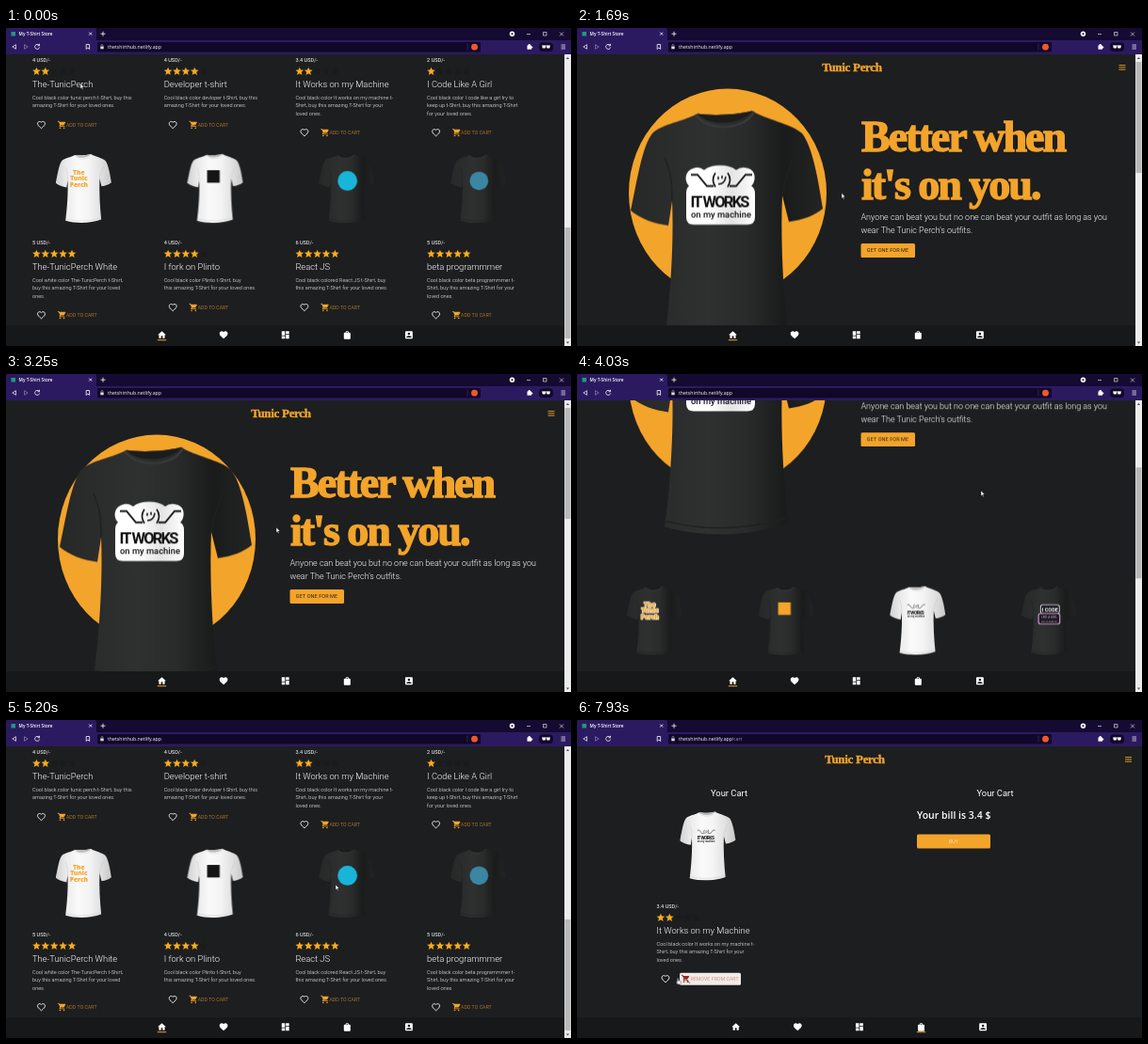
Animation of 600x338 px, one loop 8000 ms. Source, as an HTML page:

```html
<!DOCTYPE html>
<html lang="en">
<head>
<meta charset="utf-8">
<title>My T-Shirt Store</title>
<style>
  html, body { margin: 0; width: 100%; height: 100%; overflow: hidden; background: #1d1e20; }
  svg { display: block; }
  text { font-family: Roboto, sans-serif; fill: #fff; white-space: pre; }
  .ui { font-family: "Open Sans", sans-serif; font-size: 5.2px; }
  .light { font-weight: 300; }
  .small { font-size: 5.6px; }
  .btn { font-size: 5.2px; letter-spacing: .08px; }
  .lead { font-size: 8.95px; font-weight: 300; }
  .title { font-size: 9.4px; font-weight: 300; }
  .head { font-size: 9.4px; text-anchor: middle; }
  .bill { font: 600 10.5px "Open Sans", sans-serif; }
  .brand { font: bold 13px "Liberation Serif", serif; letter-spacing: -.3px; text-anchor: middle; fill: #f3a42b; stroke: #f3a42b; stroke-width: .4; }
  .slogan { font: bold 46px "Liberation Serif", serif; letter-spacing: -2px; fill: #f3a42b; stroke: #f3a42b; stroke-width: 1.4; }
  .mid { text-anchor: middle; }

  .anim { animation: 8s linear infinite; }
  .scroll { animation-name: scroll; }
  .thumb { animation-name: thumb; }
  .cursor { animation-name: cursor; }
  .hero { animation-name: hero; animation-timing-function: ease-in-out; }
  .list { animation-name: list; animation-timing-function: ease-in-out; }
  .cart { animation-name: cart; animation-timing-function: ease-in-out; }
  .blink, .show-cart, .show-buy, .hide-buy, .show-hover, .hide-hover { animation-timing-function: step-end; }
  .blink { animation-name: blink; }
  .show-cart { animation-name: showCart; }
  .show-buy { animation-name: showBuy; }
  .hide-buy { animation-name: hideBuy; }
  .show-hover { animation-name: showHover; }
  .hide-hover { animation-name: hideHover; }

  @keyframes scroll {
    0%, 6.5% { transform: translateY(-460px); animation-timing-function: ease-in-out; }
    17.9%, 46.25% { transform: none; animation-timing-function: linear; }
    50.375% { transform: translateY(-166px); animation-timing-function: cubic-bezier(.3, .5, .6, 1); }
    58%, 100% { transform: translateY(-460px); }
  }
  @keyframes thumb {
    0%, 6.5% { transform: translateY(176px); animation-timing-function: ease-in-out; }
    17.9%, 46.25% { transform: none; animation-timing-function: linear; }
    50.375% { transform: translateY(63px); animation-timing-function: cubic-bezier(.3, .5, .6, 1); }
    58%, 100% { transform: translateY(176px); }
  }
  @keyframes hero {
    0%, 2.4%, 38.6%, 75%, 100% { transform: translateY(-10.5px); }
    20.5%, 56.75% { transform: none; }
  }
  @keyframes list {
    0% { transform: translateY(-3px); animation-timing-function: ease-out; }
    11.9%, 48.1%, 84.4%, 100% { transform: translateY(-11px); }
    30%, 66.25% { transform: none; }
  }
  @keyframes cart {
    0%, 77.5% { transform: none; }
    95.6% { transform: translateY(-11px); }
    100% { transform: translateY(-9.5px); }
  }
  @keyframes cursor {
    0%, 7% { transform: translate(79px, 59px); animation-timing-function: ease-in-out; }
    16%, 21.2% { transform: translate(281px, 175.5px); }
    40.6%, 42% { transform: translate(287px, 163px); animation-timing-function: ease-in-out; }
    49.5%, 57% { transform: translate(429px, 124px); animation-timing-function: ease-in-out; }
    65%, 66% { transform: translate(350px, 175px); }
    69%, 71% { transform: translate(350px, 109px); animation-timing-function: ease-in-out; }
    76.5%, 78% { transform: translate(362px, 324px); }
    86% { transform: translate(150px, 271px); }
    91% { transform: translate(112px, 273px); }
    98%, 100% { transform: translate(106.5px, 274.5px); }
  }
  @keyframes blink { 0%, 84% { opacity: 1; } 78.5% { opacity: 0; } }
  @keyframes showCart { 0% { visibility: hidden; } 78%, 100% { visibility: visible; } }
  @keyframes showBuy { 0% { opacity: 0; } 88.75%, 100% { opacity: 1; } }
  @keyframes hideBuy { 0% { opacity: 1; } 88.75%, 100% { opacity: 0; } }
  @keyframes showHover { 0% { opacity: 0; } 90%, 100% { opacity: 1; } }
  @keyframes hideHover { 0% { opacity: 1; } 90%, 100% { opacity: 0; } }
</style>
</head>
<body>
<svg id="stage" width="600" height="338" viewBox="0 0 600 338"></svg>
<script>
const ORANGE = '#f3a42b', BG = '#1d1e20';

const ICONS = {
  home: 'M10 20v-6h4v6h5v-8h3L12 3 2 12h3v8z',
  heart: 'M12 21.3C5.4 15.4 2 12.3 2 8.5 2 5.4 4.4 3 7.5 3c1.7 0 3.4.8 4.5 2.1C13.1 3.8 14.8 3 16.5 3 19.6 3 22 5.4 22 8.5c0 3.8-3.4 6.9-10 12.8z',
  grid: 'M3 13h8V3H3zm0 8h8v-6H3zm10 0h8V11h-8zm0-18v6h8V3z',
  bag: 'M18 6h-2a4 4 0 0 0-8 0H6a2 2 0 0 0-2 2v12a2 2 0 0 0 2 2h12a2 2 0 0 0 2-2V8a2 2 0 0 0-2-2zM12 4a2 2 0 0 1 2 2h-4a2 2 0 0 1 2-2z',
  user: 'M3 5v14a2 2 0 0 0 2 2h14a2 2 0 0 0 2-2V5a2 2 0 0 0-2-2H5a2 2 0 0 0-2 2zm12 4a3 3 0 0 1-6 0 3 3 0 0 1 6 0zm-9 8c0-2 4-3.1 6-3.1s6 1.1 6 3.1v1H6z',
  cart: 'M7 18a2 2 0 1 0 0 4 2 2 0 0 0 0-4zM1 2v2h2l3.6 7.6-1.4 2.4C4.5 15.5 5.5 17 7 17h12v-2H7.4l1-2h7.2c.7 0 1.4-.4 1.7-1L21 5.5C21.3 4.8 20.8 4 20 4H5.2l-.9-2zm16 16a2 2 0 1 0 0 4 2 2 0 0 0 0-4z',
  star: 'M12 17.3 18.2 21l-1.7-7L22 9.2l-7.2-.6L12 2 9.2 8.6 2 9.2 7.5 14 5.8 21z',
};

const text = (x, y, cls, str, more = '') => `<text x="${x}" y="${y}" class="${cls}" ${more}>${str}</text>`;
const rect = (x, y, w, h, fill, r = 0) => `<rect x="${x}" y="${y}" width="${w}" height="${h}" rx="${r}" fill="${fill}"/>`;
const line = (d, color = '#fff', w = .8) => `<path d="${d}" fill="none" stroke="${color}" stroke-width="${w}"/>`;
const anim = (name, body) => `<g class="anim ${name}">${body}</g>`;
const icon = (name, cx, cy, size, paint = 'fill="#fff"') =>
  `<path d="${ICONS[name]}" transform="translate(${cx - size / 2} ${cy - size / 2}) scale(${size / 24})" ${paint}/>`;

// Shirt and prints share the large shirt's coordinates
const shirt = dark => `
  <path fill="url(#${dark ? 'black' : 'white'})" d="M128 91C114 99 90 102 80 112C69 126 64 162 57 194C68 203 82 208 97 210L101 184C103 228 99 290 93 332C130 343 185 343 224 328C219 280 216 225 218 178L225 206C240 204 253 199 261 192C256 160 250 126 239 112C228 102 200 97 186 88C172 92 145 94 128 91Z"/>
  <path fill="${dark ? '#1b1c1c' : '#b9b9b9'}" d="M128 91C145 94 172 92 186 88C176 103 140 106 128 91Z"/>
  ${line('M126 92C138 111 178 109 188 89', dark ? '#3a3b3b' : '#d8d8d8', 2)}
  ${line('M101 184C101 162 99 150 93 137M218 178C221 158 226 146 231 136M95 326Q158 342 223 322', dark ? '#202121' : '#c6c6c6', 1.5)}`;

const works = `
  ${line('M121 156h7l10 12h7M186 156h-7l-10 12h-7', '#111', 1.8)}
  ${line('M147 154q-5 7 0 15M160 154q5 7 0 15M150 158v3M154 157v3M150 166q7 0 8-8', '#111', 1.6)}
  ${text(151, 190, 'mid', 'IT WORKS', 'style="font-weight:700;font-size:16.5px;letter-spacing:-1.8px;fill:#111"')}
  ${text(153, 201, 'mid', 'on my machine', 'style="font-weight:500;font-size:9.4px;fill:#111"')}`;

const blob = '<path fill="url(#glow)" d="M124 149q6-2 11 2 6-5 17-5t17 5q5-4 12-2c10 2 9 15 4 19q4 2 4 8v25q0 8-8 8h-57q-8 0-8-8v-25q0-6 3-8c-6-6-4-17 5-19z"/>';

const lines3 = (fill, edge) => ['The', 'Tunic', 'Perch'].map((s, i) =>
  text(142, 163 + i * 22, 'mid', s, `style="font:800 23px 'Open Sans',sans-serif;fill:${fill};stroke:${edge};stroke-width:5;paint-order:stroke;stroke-linejoin:round"`)).join('');
const square = fill => rect(130, 147, 46, 46, fill);
const disc = (r, fill) => `<circle cx="162" cy="186" r="${r}" fill="${fill}"/>`;
const code = `
  ${rect(126, 155, 72, 34, '#e9e3ef', 8)}${rect(118, 186, 82, 42, '#c99ac8', 9)}
  ${rect(129, 158, 66, 28, '#1c1a22', 6)}${rect(122, 190, 74, 34, '#1c1a22', 6)}
  ${text(162, 180, 'mid', 'I CODE', 'style="font-weight:700;font-size:19px"')}
  ${text(159, 204, 'mid', 'LIKE A GIRL', 'style="font-size:11px;fill:#e5a6d8"')}
  ${text(159, 218, 'mid', 'TRY TO KEEP UP', 'style="font-size:8px"')}`;

const products = [
  ['The-TunicPerch', '4', 2, ['Cool black color tunic perch t-Shirt, buy this', 'amazing T-Shirt for your loved ones.'], true, lines3(ORANGE, '#f4ead8')],
  ['Developer t-shirt', '4', 4, ['Cool black color devloper t-Shirt, buy this', 'amazing T-Shirt for your loved ones.'], true, square(ORANGE)],
  ['It Works on my Machine', '3.4', 2, ['Cool black color It works on my machine t-', 'Shirt, buy this amazing T-Shirt for your', 'loved ones.'], false, works],
  ['I Code Like A Girl', '2', 1, ['Cool black color I code like a girl try to', 'keep up t-Shirt, buy this amazing T-Shirt', 'for your loved ones.'], true, code],
  ['The-TunicPerch White', '5', 5, ['Cool white color The-TunicPerch t-Shirt,', 'buy this amazing T-Shirt for your loved', 'ones.'], false, lines3(ORANGE, 'none')],
  ['I fork on Plinto', '4', 4, ['Cool black color Plinto t-Shirt, buy', 'this amazing T-Shirt for your loved ones.'], false, square('#151515')],
  ['React JS', '6', 5, ['Cool black colored React JS t-Shirt, buy', 'this amazing T-Shirt for your loved ones.'], true, disc(36, '#19b5d8')],
  ['beta programmmer', '5', 5, ['Cool black color beta programmmer t-', 'Shirt, buy this amazing T-Shirt for your', 'loved ones.'], true, disc(34, '#3b86a3')],
];

const addButton = (x, y) => icon('cart', x + 31.5, y, 10, `fill="${ORANGE}"`) + text(x + 36, y + 1.9, 'btn light', 'ADD TO CART', `style="fill:${ORANGE}"`);

const removeLabel = (x, y, ink, mark) =>
  icon('cart', x + 31, y, 9.5, `fill="${mark}"`) + line(`M${x + 26.5} ${y - 4.5}l9 9`, mark, 1) +
  text(x + 36, y + 1.9, 'btn light', 'REMOVE FROM CART', `style="fill:${ink}"`);
const removeButton = (x, y) =>
  anim('hide-hover', removeLabel(x, y, '#7d2020', '#dd3a25')) +
  anim('show-hover', rect(x + 24.5, y - 6.5, 65, 13, '#efecea', 1.5) + removeLabel(x, y, '#d9643f', '#8f2c20'));

// y is the middle of the price line
function card([title, price, stars, desc, dark, print], x, y, float, button) {
  const by = y + 52.6 + desc.length * 8.2;
  const row = [0, 1, 2, 3, 4].map(i =>
    icon('star', x + 4.4 + i * 9.4, y + 12, 10.4, i < stars ? 'fill="#f9ad1c"' : 'fill="#1a1b1d"')).join('');
  return anim(float, `<g transform="translate(${x + 8.2} ${y - 116.5}) scale(.29)">${shirt(dark)}${print}</g>`) +
    text(x, y + 2, 'small', `${price} USD/-`) + row +
    text(x, y + 28.7, 'title', title) +
    desc.map((s, i) => text(x, y + 42 + i * 8.3, 'small light', s)).join('') +
    icon('heart', x + 9.5, by, 9.5, 'fill="none" stroke="#fff" stroke-width="2.2"') + button(x, by);
}

const menu = x => line(`M${x} 39.6h7M${x} 41.9h7M${x} 44.2h7`, ORANGE, .9);

const home = `
  ${text(292, 45.5, 'brand', 'Tunic Perch')}${menu(575.5)}
  <ellipse cx="160" cy="175.5" rx="105" ry="111" fill="${ORANGE}"/>
  ${anim('hero', shirt(true) + blob + works)}
  ${text(302, 131, 'slogan', 'Better when')}${text(302, 181.5, 'slogan', "it's on you.")}
  ${text(301.5, 204, 'lead', 'Anyone can beat you but no one can beat your outfit as long as you')}
  ${text(301.5, 218, 'lead', "wear The Tunic Perch's outfits.")}
  ${rect(301.5, 229, 57.5, 15, ORANGE, 1.5)}
  ${text(330, 238.4, 'btn mid', 'GET ONE FOR ME', 'style="fill:#2b2214;font-size:5.5px"')}
  ${products.map((p, i) => card(p, 28 + i % 4 * 139.7, i < 4 ? 494 : 688, 'list', addButton)).join('')}`;

const nav = (x, active) => rect(0, 316, 600, 22, '#17181a') +
  ['home', 'heart', 'grid', 'bag', 'user'].map((n, i) => icon(n, x + i * 65.6, 326.3, 10.5)).join('') +
  rect(x + active * 65.6 - 4.7, 331.2, 9.4, 1, ORANGE);

const scrollbar = rect(593, 28, 7, 310, '#ececec') + anim('thumb', rect(593.5, 36, 6, 118, '#b9b9b9')) +
  '<path d="M594.8 33l1.7-2 1.7 2zM594.8 333.5l1.7 2 1.7-2z" fill="#555"/>';

const browser = `
  ${rect(0, 0, 600, 13, '#150a31')}${rect(0, 0, 96, 14, '#2b1a60', 2)}${rect(0, 13, 600, 15, '#2b1a60')}
  ${rect(5.5, 4, 4.5, 4.5, '#1f9a80')}
  ${text(13.6, 8, 'ui', 'My T-Shirt Store', 'style="font-weight:600;font-size:4.7px"')}
  ${line('M88.2 4.6l3 3m0-3l-3 3M103 3.7v5M100.5 6.2h5')}
  <circle cx="537.5" cy="6.3" r="2.7" fill="#fff"/><circle cx="537.5" cy="6.3" r="1" fill="#150a31"/>
  ${line('M553 6.5h4M570.5 4.5h3.5v3.5h-3.5zM588 4.5l4 4m0-4l-4 4', '#fff', .6)}
  ${line('M10.5 17.7v4.6l-3.7-2.3z', '#fff', .7)}${line('M19.5 17.7v4.6l3.7-2.3z', '#9187b5', .7)}
  ${line('M35 18.2a2.5 2.5 0 1 0 .6 2.3M35.5 16.8v2h-2M85.2 17.5h3.4v5l-1.7-1.5-1.7 1.5z')}
  ${rect(97, 15, 407, 10.5, '#110728', 1.5)}
  ${rect(100.3, 19.5, 3.4, 2.8, '#ddd')}${line('M101 19.5v-1a1 1 0 0 1 2 0v1', '#ddd', .5)}
  ${text(108, 21.9, 'ui', 'thetshirthub.netlify.app')}
  ${line('M490 16.5v7', '#51467a', .5)}<circle cx="497.5" cy="20.2" r="3.4" fill="#f0572c"/>
  ${rect(553.5, 18.5, 4.5, 4.2, '#fff')}<circle cx="555.7" cy="18.2" r="1.2" fill="#fff"/><circle cx="558.3" cy="20.5" r="1.1" fill="#fff"/>
  ${rect(566, 15.5, 15, 9.5, '#110728', 4)}${rect(569.5, 18.8, 3.6, 2.6, '#fff', 1)}${rect(574, 18.8, 3.6, 2.6, '#fff', 1)}
  ${line('M569 18.9h9')}${line('M589.5 18h4.5M589.5 20h4.5M589.5 22h4.5', '#fff', .7)}`;

const cartPage = `
  ${rect(0, 28, 600, 310, BG)}${nav(168.7, 3)}
  ${text(164.2, 21.9, 'ui', '/cart', 'style="fill:#9a92b8"')}
  ${text(295, 45.5, 'brand', 'Tunic Perch')}${menu(582)}
  ${text(161.5, 81, 'head', 'Your Cart')}${text(444, 81, 'head', 'Your Cart')}
  ${card(products[2], 84.5, 198, 'cart', removeButton)}
  ${text(361, 105, 'bill', 'Your bill is 3.4 $')}
  ${anim('hide-buy', text(361, 122.2, 'bill', 'Please login or add something') + text(361, 136.2, 'bill', 'to cart'))}
  ${anim('show-buy', rect(361, 121.5, 78, 15, ORANGE, 1.5) + text(400, 130.9, 'btn mid light', 'BUY'))}`;

const pointer = anim('cursor', anim('blink',
  anim('hide-hover', '<path d="M0 0v5.6l1.3-1.2.9 2 .8-.4-.9-1.9h1.8z" fill="#fff" stroke="#111" stroke-width=".4"/>') +
  anim('show-hover', '<path d="M0 0q.8-.6 1.2.3v2l2.6.8v2l-.8 1.5H.6L-1.3 4l.6-.5.7.5z" fill="#fff" stroke="#111" stroke-width=".4"/>')));

const gradient = (id, ...stops) => `<linearGradient id="${id}">${stops.map((c, i) =>
  `<stop offset="${i / (stops.length - 1)}" stop-color="${c}"/>`).join('')}</linearGradient>`;

document.getElementById('stage').innerHTML = `
  <defs>
    ${gradient('black', '#272828', '#2b2c2c', '#2f3030', '#2a2b2b', '#1a1b1b', '#232424')}
    ${gradient('white', '#d2d2d2', '#ececec', '#fafafa', '#f4f4f4', '#e2e2e2', '#c8c8c8')}
    ${gradient('glow', '#fff', '#fff', '#e4e4e4', '#fff')}
  </defs>
  ${rect(0, 0, 600, 338, BG)}
  ${anim('scroll', home)}${nav(165.5, 0)}${scrollbar}${browser}
  ${anim('show-cart', cartPage)}${pointer}`;
</script>
</body>
</html>
```
